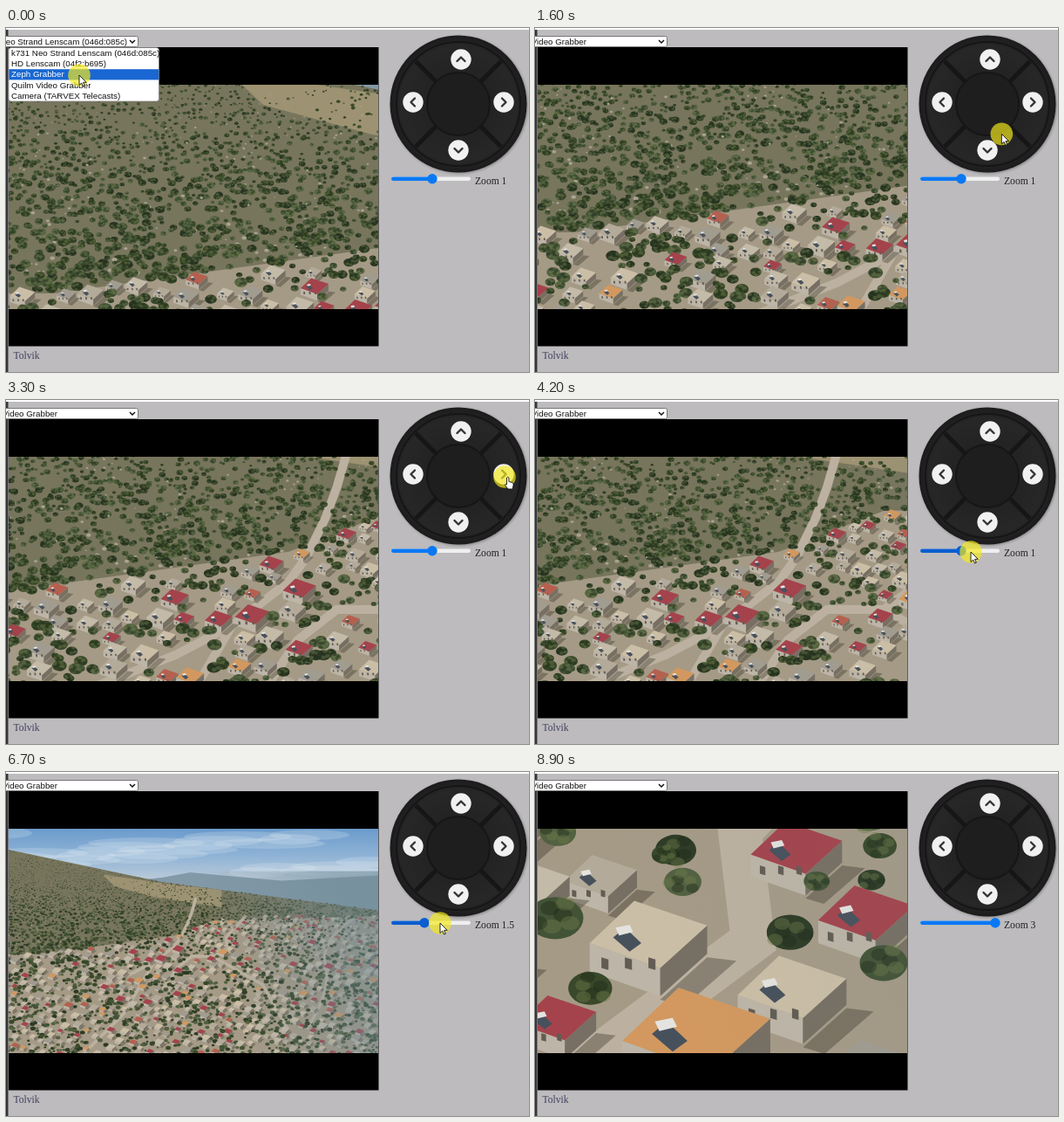
Recreate the animation shown at these times as an HTML page with a canvas. Size 600x394 px, loop 9000 ms.

```html
<!DOCTYPE html>
<html lang="en">
<head>
<meta charset="utf-8">
<title>Camera control</title>
<style>
html, body { margin: 0; width: 100%; height: 100%; overflow: hidden; background: #bdbbbd; }
#stage { position: relative; width: 600px; height: 394px; overflow: hidden; }
canvas { position: absolute; left: 3px; top: 65px; }
svg { position: absolute; left: 0; top: 0; }
.ui { font: 9.75px "Liberation Sans", Arial, sans-serif; fill: #111; }
.serif { font: 11.6px "Liberation Serif", "Times New Roman", serif; fill: #222; }
.chevron { fill: none; stroke: #333; stroke-width: 2.4; stroke-linecap: round; stroke-linejoin: round; }
</style>
</head>
<body>
<div id="stage">
  <svg width="600" height="394">
    <path fill="#fff" d="M0 0H600V2H0Z"/>
    <path fill="#353437" d="M0 2H2.500V394H0Z"/>
    <path d="M3 22H427.500V364.500H3Z"/>
  </svg>
  <canvas id="view" width="424" height="257"></canvas>
  <svg width="600" height="394">
    <defs>
      <radialGradient id="disc">
        <stop offset="0" stop-color="#1e1e1f"/>
        <stop offset=".85" stop-color="#272728"/>
        <stop offset="1" stop-color="#1b1b1c"/>
      </radialGradient>
      <filter id="soft" x="-20%" y="-20%" width="140%" height="140%"><feGaussianBlur stdDeviation="1.5"/></filter>
      <g id="button">
        <circle r="11.700" fill="#f1f1f1"/>
        <path class="chevron" d="M-4.500 2L0-2.500 4.500 2"/>
      </g>
    </defs>

    <rect x="-40" y="9.500" width="191.500" height="12" rx="2" fill="#fff" stroke="#767676"/>
    <text class="ui" id="chosen" y="19" text-anchor="end"></text>
    <path d="M142 14l3 3 3-3" fill="none" stroke="#111" stroke-width="1.500"/>
    <g id="menu">
      <rect x="3" y="22.500" width="172.500" height="61.500" rx="3" fill="#fff" stroke="#777" stroke-width=".7"/>
      <rect id="bar" x="3.400" width="171.700" height="12.200" fill="#1967d2"/>
    </g>

    <circle cx="520" cy="88" r="78.500" opacity=".3" filter="url(#soft)"/>
    <circle cx="519" cy="87" r="78.500" fill="url(#disc)"/>
    <g fill="none" stroke="#161617">
      <circle cx="519" cy="87" r="71" stroke-width="2"/>
      <circle cx="519" cy="87" r="36" fill="#1e1e1f" stroke-width="2"/>
      <path stroke-width="5" d="M494 62L470 38M544 62L568 38M494 112L470 136M544 112L568 136"/>
    </g>
    <use href="#button" transform="translate(522 36)"/>
    <use href="#button" transform="translate(571 85) rotate(90)"/>
    <use href="#button" transform="translate(519 140) rotate(180)"/>
    <use href="#button" transform="translate(467 85) rotate(270)"/>

    <rect x="442" y="170.500" width="91" height="4.600" rx="2.300" fill="#efefef"/>
    <rect id="fill" x="442" y="170.500" height="4.600" rx="2.300"/>
    <circle id="thumb" cy="172.800" r="5.700"/>
    <text class="serif" id="label" x="538" y="179"></text>
    <text class="serif" x="8.500" y="378.500" style="fill:#41405f">Tolvik</text>

    <g id="pointer">
      <circle r="12.800" fill="#f4ea1c" opacity=".68"/>
      <g fill="#fff" stroke="#111" stroke-width=".9" stroke-linejoin="round">
        <path id="arrow" d="M0 0V11.500L2.700 9 4.500 13 6.300 12.200 4.600 8.300H8.200Z"/>
        <path id="hand" d="M2.500 1q1.200-1.600 2.400 0V5.500l3.800 1q1.800.6 1.400 2.700L9.200 14H4L.5 9.500q0-1.800 2 -.6Z"/>
      </g>
    </g>
  </svg>
</div>
<script>
const LOOP = 9000, STEP = 100;
const $ = id => document.getElementById(id);
const clamp = (v, lo, hi) => Math.min(hi, Math.max(lo, v));
const ramp = (t, from, to) => clamp((t - from) / (to - from), 0, 1);
const ctx = $('view').getContext('2d');

let seed = 41;
function rnd(lo = 0, hi = 1) {
  seed = (seed + 0x6d2b79f5) | 0;
  let n = Math.imul(seed ^ (seed >>> 15), 1 | seed);
  n = (n + Math.imul(n ^ (n >>> 7), 61 | n)) ^ n;
  return lo + (hi - lo) * ((n ^ (n >>> 14)) >>> 0) / 4294967296;
}
const pick = list => list[Math.floor(rnd(0, list.length))];

// ---- landscape ----
const LEFT = -270, RIGHT = 950, BOTTOM = 570;
const RED = '#a4434c', ORANGE = '#d2985f', TAN = '#cbbea6';
const ridge = x => 5 + (x - 243) * (x < 243 ? .21 : .13);
const depth = y => clamp(.28 + y / 300, .25, 1.15);
const villageEdge = x => 213 - .14 * clamp(x, -150, 500) - .25 * clamp(x - 280, 0, 120);
const clump = (x, y) => Math.sin(x * .045 + 2 * Math.sin(y * .06)) * Math.sin(y * .08 + x * .02);
const roads = new Path2D('M348 55L335 100 322 135 300 180 280 208 215 258 150 292 40 335M240 350L290 275 335 240 400 240 447 205 444 180 500 120M215 258L120 420-20 560M400 240L560 330 640 470M700 470Q780 350 760 270T850 120');
const field = new Path2D('M50-20L240 8 430 30V84L215 52 90 18Z');
const mountains = new Path2D('M150 0L243-10 330-26 480-12 620 0 960-18V130H150Z');

// Buildings that can be told apart: x, y, width, roof.
const LANDMARKS = [
  [149, 226, 32, RED], [260, 187, 28, RED], [292, 216, 38, RED], [238, 246, 40, RED],
  [423, 204, 27, TAN], [434, 226, 34, ORANGE], [473, 199, 22, RED], [457, 184, 21, RED],
  [402, 223, 18, RED], [456, 216, 25, TAN]
];

const houses = LANDMARKS.map(([x, y, w, roof]) => ({ x, y, w, roof }));
const trees = [];
const onRoad = (x, y) => ctx.isPointInStroke(roads, x, y);
const built = (x, y, gap) => houses.some(h => Math.abs(h.x - x) < h.w * .5 + gap && Math.abs(h.y - y) < h.w * .35 + gap * .6);

function buildHouses() {
  for (let y = 100; y < BOTTOM; y += 15 * depth(y)) {
    const d = depth(y);
    for (let x = LEFT; x < RIGHT; x += 25 * d) {
      const hx = x + rnd(0, 16) * d, hy = y + rnd(0, 9) * d, w = rnd(17, 30) * d;
      const roof = rnd() < .26 ? pick([RED, RED, '#b5604f', ORANGE]) : pick(['#c3baa8', '#b3aa99', TAN, '#a19c90']);
      const free = !onRoad(hx, hy) && !built(hx, hy, w * .38);
      if (rnd() < .75 && hy > villageEdge(hx) && free) houses.push({ x: hx, y: hy, w, roof });
    }
  }
}

function buildTrees() {
  for (let y = -100; y < BOTTOM; y += 4 + 4 * depth(y)) {
    const d = depth(y);
    for (let x = LEFT; x < RIGHT; x += 5 + 4 * d) {
      const tx = x + rnd(0, 9), ty = y + rnd(0, 8), town = ty > villageEdge(tx);
      const cover = (town ? .42 : ctx.isPointInPath(field, tx, ty) ? .4 : .8) + .4 * clump(tx, ty);
      const rock = !town && rnd() < .1;
      const tone = rock ? '#a9a391' : pick(['#2d3b25', '#384829', '#435336', '#526140']);
      const r = (rock ? rnd(1, 3.5) : rnd(3, 7.5)) * d;
      if (rnd() > cover || ty < ridge(tx) || onRoad(tx, ty) || built(tx, ty, 0)) continue;
      trees.push({ x: tx, y: ty, r, tone, rock });
    }
  }
}

ctx.lineWidth = 12;
buildHouses();
buildTrees();
const items = [...trees, ...houses].sort((a, b) => a.y - b.y);

function poly(color, points) {
  ctx.fillStyle = color;
  ctx.beginPath();
  points.forEach(([x, y]) => ctx.lineTo(x, y));
  ctx.fill();
}

function blob(color, x, y, rx, ry = rx * .75) {
  ctx.fillStyle = color;
  ctx.beginPath();
  ctx.ellipse(x, y, rx, ry, 0, 0, 7);
  ctx.fill();
}

function drawHouse({ x, y, w, roof }, fine) {
  const at = (u, v) => [x + u * w, y + v * w * .6];
  poly('rgba(45,42,32,.35)', [at(.1, .9), at(.5, .3), at(.75, .35), at(.3, 1)]);
  poly('#bdb5a7', [at(-.5, .1), at(.1, .45), at(.1, .85), at(-.5, .5)]);
  poly('#776f63', [at(.1, .45), at(.5, -.15), at(.5, .25), at(.1, .85)]);
  poly(roof, [at(-.5, .1), at(-.12, -.5), at(.5, -.15), at(.1, .45)]);
  if (!fine) return;
  poly('#47515c', [at(-.3, .02), at(-.2, -.12), at(-.06, .1), at(-.16, .22)]);
  poly('#e4e3df', [at(-.28, -.12), at(-.16, -.16), at(-.13, -.06), at(-.25, -.01)]);
  for (const u of [-.4, -.2, 0]) poly('#625c53', [at(u, .3), at(u + .06, .33), at(u + .06, .48), at(u, .45)]);
}

function drawTree({ x, y, r, tone, rock }, fine) {
  blob(tone, x, y, r);
  if (rock || !fine) return;
  for (let i = 0; i < 6; i++) {
    const a = i * 2.4 + x, k = r * (.3 + i * .09);
    blob(i % 2 ? 'rgba(112,126,76,.4)' : 'rgba(28,40,22,.4)', x + Math.cos(a) * k, y + Math.sin(a) * k * .8, r * .34);
  }
}

function gradient(x0, y0, x1, y1, ...colors) {
  const g = ctx.createLinearGradient(x0, y0, x1, y1);
  colors.forEach((c, i) => g.addColorStop(i / (colors.length - 1), c));
  return g;
}

function drawSky() {
  ctx.fillStyle = gradient(0, 65, 0, 130, '#6b9bcc', '#91b4d6', '#c5d0da');
  ctx.fillRect(0, 60, 430, 265);
  for (let i = 0; i < 24; i++) blob('rgba(228,234,240,.22)', i * 151 % 430, 70 + i * 29 % 46, 30 + i * 17 % 40, 6);
}

function drawLand(cx, cy, s) {
  ctx.translate(215, 193);
  ctx.scale(s, s);
  ctx.translate(-cx, -cy);
  ctx.fillStyle = '#8299a8';
  ctx.fill(mountains);
  poly('#78755d', [[LEFT, ridge(LEFT)], [243, 5], [RIGHT, ridge(RIGHT)], [RIGHT, 650], [LEFT, 650]]);
  poly('#a59a86', [...[LEFT, -150, 280, 400, RIGHT].map(x => [x, villageEdge(x)]), [RIGHT, 650], [LEFT, 650]]);
  ctx.fillStyle = '#9d9272';
  ctx.fill(field);
  ctx.strokeStyle = '#bcb1a0';
  ctx.lineWidth = 10;
  ctx.stroke(roads);
  for (const it of items) {
    if (Math.abs(it.x - cx) > 215 / s + 30 || Math.abs(it.y - cy) > 130 / s + 30) continue;
    it.roof ? drawHouse(it, s > .8) : drawTree(it, s > .8);
  }
  ctx.fillStyle = gradient(800, 0, 400, 140, 'rgba(110,138,150,.5)', 'rgba(110,138,150,0)');
  ctx.fillRect(LEFT, -30, RIGHT - LEFT, 660);
}

function drawView(t) {
  const down = ramp(t, 700, 1500), right = ramp(t, 1500, 3800);
  const closer = ramp(t, 4300, 5300), wide = ramp(t, 5500, 6450), close = ramp(t, 6700, 8500);
  const cx = 10 + 205 * right + 60 * closer + 65 * wide + 100 * close;
  const cy = 123 + 70 * down + 5 * closer - 8 * wide + 15 * close;
  const scale = 2 ** (1.63 * closer - 3.1 * wide + 3.79 * close);
  ctx.save();
  ctx.translate(-3, -65);
  drawSky();
  drawLand(cx, cy, scale);
  ctx.restore();
}

// ---- controls ----
const OPTIONS = ['k731 Neo Strand Lenscam (046d:085c)', 'HD Lenscam (04f2:b695)', 'Zeph Grabber', 'Quilm Video Grabber', 'Camera (TARVEX Telecasts)'];
const optionTexts = OPTIONS.map((name, i) => {
  const text = document.createElementNS('http://www.w3.org/2000/svg', 'text');
  text.setAttribute('class', 'ui');
  text.setAttribute('x', 6);
  text.setAttribute('y', 32 + i * 12.2);
  text.textContent = name;
  return $('menu').appendChild(text);
});

// Pointer moves: from time, to time, destination.
const MOVES = [
  [0, 200, 76, 66], [200, 800, 517, 138], [1500, 1800, 572, 88], [3700, 4100, 500, 174], [4300, 5000, 519, 193],
  [5200, 5900, 450, 174], [6450, 6700, 498, 173], [6700, 7000, 529, 176], [7300, 8300, 640, 350]
];
function pointerAt(t) {
  return MOVES.reduce(([px, py], [from, to, x, y]) => {
    const k = ramp(t, from, to);
    return [px + (x - px) * k, py + (y - py) * k];
  }, [84, 54]);
}

const between = (t, from, to) => t >= from && t <= to;
const show = (id, on) => $(id).style.display = on ? '' : 'none';
const set = (id, name, value) => $(id).setAttribute(name, value);

function drawMenu(t) {
  const open = t < 200, active = t < 100 ? 2 : 3;
  show('menu', open);
  set('bar', 'y', 22.8 + active * 12.2);
  optionTexts.forEach((text, i) => text.style.fill = i === active ? '#fff' : '#111');
  $('chosen').textContent = OPTIONS[open ? 0 : 3];
  set('chosen', 'x', open ? 139 : 59);
}

function drawSlider(t) {
  const x = 489 + 23 * ramp(t, 4300, 4700) - 64 * ramp(t, 5450, 5900) + 80 * ramp(t, 6500, 7000);
  const held = between(t, 4100, 4800) || between(t, 5300, 7200);
  const value = t <= 4300 ? 1 : Math.min(3, Math.round((x - 448) / 80 * 6 + .6) / 2);
  set('fill', 'width', x - 442);
  set('thumb', 'cx', x);
  ['fill', 'thumb'].forEach(id => set(id, 'fill', held ? '#0a5ed0' : '#0a78f5'));
  $('label').textContent = 'Zoom ' + value;
}

function drawPointer(t) {
  const overButton = between(t, 800, 1500) || between(t, 1800, 3700);
  set('pointer', 'transform', `translate(${pointerAt(t)})`);
  show('hand', overButton);
  show('arrow', !overButton);
}

const start = performance.now();
let last = -1;
function frame() {
  const t = Math.floor((performance.now() - start) % LOOP / STEP) * STEP;
  if (t !== last) {
    last = t;
    [drawView, drawMenu, drawSlider, drawPointer].forEach(draw => draw(t));
  }
  requestAnimationFrame(frame);
}
frame();
</script>
</body>
</html>
```
